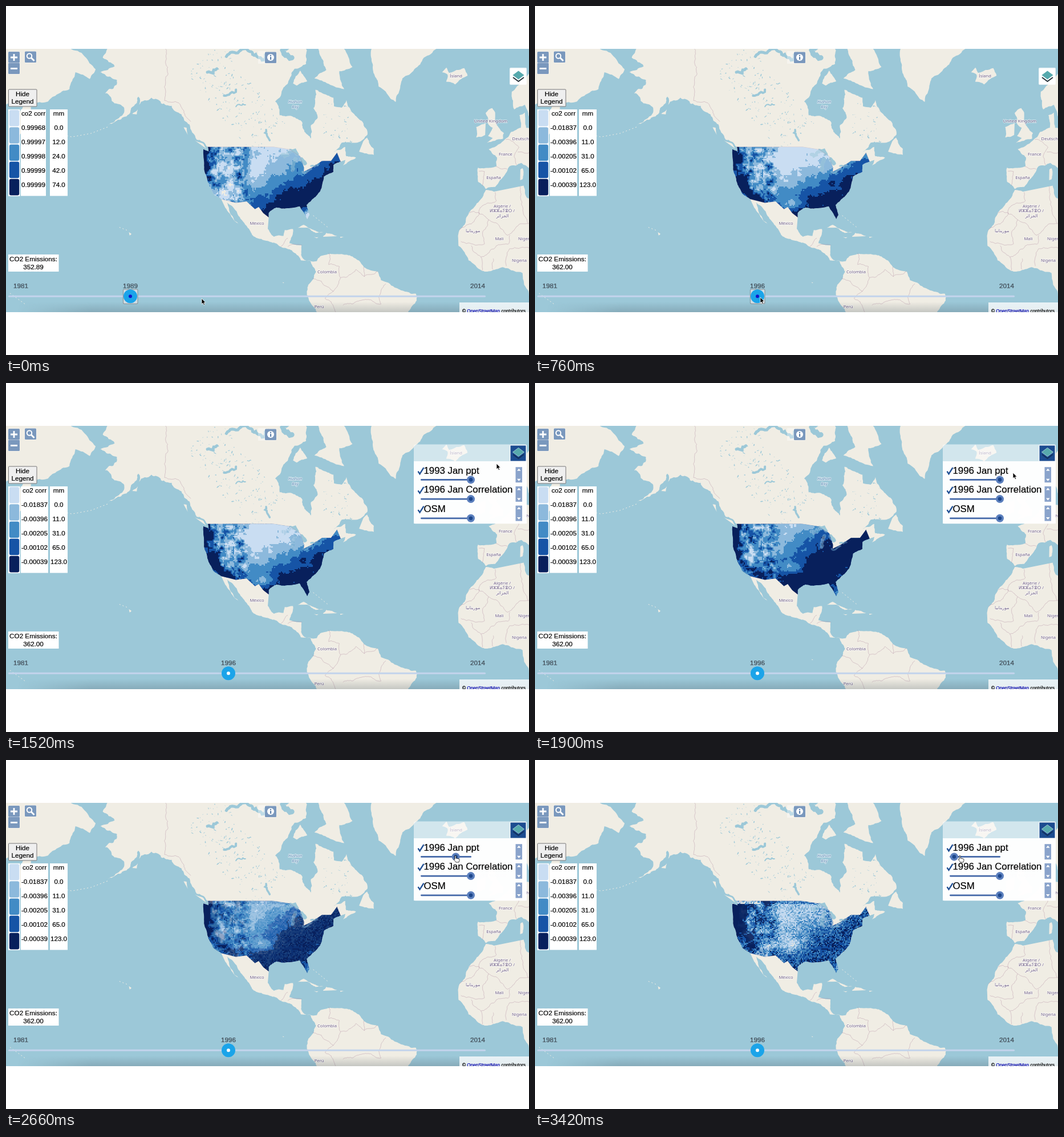
Animation, 917 px wide and 611 px high, one loop 3.8 s. Source, as an HTML page with a canvas:

```html
<!DOCTYPE html>
<html lang="en">
<head>
<meta charset="utf-8">
<title>Climate map</title>
<style>
html, body { margin: 0; width: 100%; height: 100%; overflow: hidden; background: #fff; }
#map { position: absolute; left: 0; top: 75px; width: 917px; height: 461px; overflow: hidden; background: #9cc8d8; }
#map > * { position: absolute; left: 0; top: 0; }
#shade { top: 443px; width: 917px; height: 18px;
  background: linear-gradient(transparent, rgba(70, 85, 95, .25));
  -webkit-mask-image: linear-gradient(90deg, transparent 20px, #000 150px);
  mask-image: linear-gradient(90deg, transparent 20px, #000 150px); }
svg { font: 11.7px "Liberation Sans", Arial, Helvetica, sans-serif; }
svg text { paint-order: stroke; stroke: currentColor; stroke-width: .2; }
</style>
</head>
<body>
<div id="map">
  <canvas id="base" width="917" height="461"></canvas>
  <div id="shade"></div>
  <svg id="ui" width="917" height="461" viewBox="0 75 917 461"></svg>
</div>
<script>
const TOP = 75, WATER = '#9cc8d8', LAND = '#f0ede4';
const BLUES = ['#c9ddf2', '#8cb9dc', '#428bc5', '#1654a6', '#08205c'];
const map = document.getElementById('map'), ui = document.getElementById('ui');
const clamp = (v, lo, hi) => Math.max(lo, Math.min(hi, v));
const bump = (x, y, cx, cy, rx, ry) => Math.exp(-(((x - cx) / rx) ** 2) - ((y - cy) / ry) ** 2);

const hash = (x, y, s = 0) => {
  const v = Math.sin(x * 127.1 + y * 311.7 + s * 74.7) * 43758.5453;
  return v - Math.floor(v);
};

// Web Mercator, "lon,lat lon,lat ..." to stage pixels
const project = ([lon, lat]) => [866 + 4.17 * lon,
  482 - 239 * Math.log(Math.tan(Math.PI / 4 + lat * Math.PI / 360))];
const line = s => s.trim().split(/\s+/).map(p => project(p.split(',').map(Number)));

// midpoint displacement between key points gives a ragged edge
function ragged(a, b, k) {
  const dx = b[0] - a[0], dy = b[1] - a[1];
  if (Math.hypot(dx, dy) < 4) return [a];
  const d = (hash(Math.round(a[0]), Math.round(b[1])) - .5) * k;
  const mid = [(a[0] + b[0]) / 2 - dy * d, (a[1] + b[1]) / 2 + dx * d];
  return [...ragged(a, mid, k), ...ragged(mid, b, k)];
}
function coast(s, k = .2) {
  const pts = line(s);
  return pts.flatMap((p, i) => i + 1 < pts.length ? ragged(p, pts[i + 1], k) : [p]);
}

const alaska = coast(`-141,71 -164,70 -167,68 -162,66.6 -168,65.6 -161,64.2 -166,61.7 -162,59.6 -158,58.7 -158.5,57.2
  -165,54.6 -156,57.2 -152,61 -151.7,59.3 -146.5,60.8 -138,59.1 -130.5,54.8 -127.5,51 -123.5,49.3`, .35);
const usWest = coast('-122.8,49 -122.5,47.8 -124.7,48.4 -124.4,42.5 -122.5,37.5 -120.6,34.5 -117.2,32.6', .1);
const pacific = coast(`-115.5,29.5 -112,25 -109.6,23.1 -114.7,31.4 -112.5,30 -109.4,26 -105.5,21.5 -103.5,18.5 -95,16
  -91.5,14 -87.5,12.9 -83.7,8.8 -79.6,8.6 -77.3,4 -80.6,-1.5 -81.2,-5.5 -77.5,-11.5 -76.5,-14`);
const atlantic = coast(`-39,-14 -38.5,-12.5 -35,-8 -35.3,-5.2 -44.3,-2.6 -50,.5 -51.3,4 -57.2,6 -62,10.4 -71.4,11.5
  -75.5,10.5 -77,8.4 -82.3,9 -83.6,11 -83.4,15 -88.5,15.8 -87,21.4 -90.5,21 -91,18.7 -95,18.4 -97.6,21.5`);
const usEast = coast(`-97.2,25.9 -97.2,27.6 -94,29.6 -89.4,29.3 -84.2,30 -82.7,28 -81,25.2 -80.1,26.8 -81.3,30.5
  -75.6,35.3 -74,40.2 -70,41.7 -70,43.8 -67,44.8`, .15);
const canada = coast(`-65,45.3 -66,43.7 -60.5,46 -64.6,46.4 -65,49 -70,47.6 -66.5,50.2 -60,50.2 -55.7,52.3 -61.8,57.5
  -64.5,60.3 -66.5,58.7 -69.8,59 -70,60.8 -77.5,62.4 -78.4,58.6 -76.6,56.5 -79.5,54.6 -79.5,51.3 -82.2,53 -83,55.2
  -92.6,57 -94.5,60 -91,62.8 -86.3,66.2 -81.5,67 -82,71`, .25);
const mexBorder = line('-117.2,32.6 -111,31.3 -106.5,31.8 -103,29 -101.4,29.8 -99.5,27.5 -97.2,25.9');
const usNorth = line(`-67,44.8 -68.5,47.4 -71,45 -74.8,45 -79,43 -82.5,41.7 -82.4,43 -84,46.4 -88.4,48.3 -95.2,49 -122.8,49`);

const usa = [...usWest, ...mexBorder, ...usEast, ...usNorth];
const land = [
  [...alaska, ...usWest, ...pacific, ...atlantic, ...usEast, ...canada],
  ...[
    // Siberia, Baffin, Southampton, Newfoundland
    '-208,71 -181,69.5 -170,66.1 -172.5,64.4 -178.5,65.6 -181,62.5 -190,60 -197,59.5 -198,55 -203,51 -204,56 -197,62 -208,59.2',
    '-78,71 -67,70.5 -62,66.5 -67.5,65.8 -65.5,62.5 -72,63.5 -78,64.5 -73,66 -76,69',
    '-85.5,63.2 -81,64 -84,65.9 -87,63.6',
    '-59.2,47.7 -53,46.8 -53,48.5 -55.8,51.5 -57.5,50.5',
    // Greenland, Iceland, Great Britain, Ireland
    '-54,71 -53.5,67 -51,63 -46,60.6 -43.8,59.9 -41,64.5 -32,68 -22,71',
    '-22.5,66.4 -21.4,65.5 -15,66.3 -13.6,65 -18.8,63.4 -22.6,63.9 -22,65.2 -24.3,65.6',
    '-5.5,50.1 1.3,51.2 1.7,52.7 -2,55.8 -2,57.6 -3.2,58.6 -6,57.5 -4.8,54.8 -3,54 -5,52 -3,51.4',
    '-6.2,52.2 -10,51.6 -10,54.2 -6,55.2',
    // Scandinavia, Europe, Africa
    '16,68 12.5,65.5 5,62 6,58.3 10.5,59.3 13,55.6 16,55',
    `16,54 11,54 10.5,57.6 8.2,57 8.8,54 4.8,53 1.7,50.8 -1.6,49.2 -4.7,48.4 -1.2,46 -1.4,43.5 -9.2,43 -9.2,38.5
     -6,36.1 -2,36.8 0,39 3.1,42 4,43.4 9,44.4 16,40`,
    `10,37.2 11.2,33.2 16,32 16,-14 12.2,-6 9.5,3.5 6,4.3 1,5.9 -7.5,4.4 -13.2,8.8 -17.4,14.7 -17,21 -13,27.8
     -9.8,31 -5.9,35.8 -2.5,35.2`,
    // islands
    '8.6,42.4 9.5,42.8 9.5,39.3 8.5,39', '-85,21.9 -82.5,23.1 -74.2,20.2 -77.5,19.9 -81,22', '-74.4,18.4 -73,19.9 -68.4,18.6',
    '-78.3,18.3 -76.3,18.2 -77,17.8', '-67.2,18.4 -65.7,18.4 -67,17.9', '-156,20.2 -154.9,19.5 -155.7,18.9',
    '-128.3,50.8 -125,50 -123.4,48.5', '-133,54.1 -131.7,54 -131.2,52.2', '-154.6,57.3 -152.3,58.3 -152.7,57.2'
  ].map(s => coast(s))
];
const chains = ['-165,54.2 -172,52.6 -180,51.7 -188,52.9', '-160,22.1 -156.4,20.8', '-78.5,26.6 -72,21.8',
  '-206,-5 -199,-10', '-91.3,-.5 -90.2,-.8'].map(line);
// width, then the middle line of each lake
const lakes = [[6, '-91.5,46.9 -88,48 -85.3,47'], [6, '-87.2,42.2 -86.8,44 -86,45.6'], [7, '-83.5,45.5 -82,44.3'],
  [3, '-83,41.7 -79.3,42.6'], [3, '-79.4,43.5 -76.6,43.7'], [3.5, '-98.3,53.5 -96.8,50.8'], [5, '-123,65.6 -119,66.2'],
  [4, '-116,61.2 -111,62.4'], [2, '-111,58.9 -107,59.3'], [5, '-115,68.2 -104,68.5 -96,68.5'], [9, '-89,71 -87.5,68']
].map(([w, s]) => [w, coast(s, .6)]);
const borders = ['-141,69.6 -141,60.2 -135,59.7 -130,55.5', '-72,11.8 -72,7 -67.5,6.2 -67,1.5 -70,-4.2 -73.5,-7 -69,-13',
  '-78.8,1.5 -72,-2.5 -70,-4.2', '-67,1.5 -60.5,5 -57,2 -51.5,4.2', '-57,2 -57.2,6', '-66,-10 -50,-9.5 -48,-1',
  '-92,14.6 -89.2,17.8', '-89.2,14.4 -83.2,15', '-13,27.6 -8.7,27.6 -12,23.4 -17,21.2', '-2,35 -1.5,32 -8.7,28.7 -8.7,27.3 -4.8,25 3.2,19 12,23.5',
  '-4.8,25 -6.5,15.5 -16.4,16.5', '12,23.5 9.5,30 8.5,37', '4.2,19 3.5,15.4 -4,13 -8,10.2 -12,14.8', '2.7,6.4 4,13.5 13,13.5',
  '-3,5 -2.8,9.5', '-7.5,4.5 -8,10.2', '-1.7,43.4 3.1,42.5', '-8.8,41.9 -6.5,41.8 -7.4,37.2', '2.5,51 8,49 6,46.2 7,43.8', '7.5,47.6 13,47.6'
].map(s => coast(s, .3)).concat([mexBorder, usNorth]);

const trace = (g, pts) => pts.forEach(([x, y], i) => i ? g.lineTo(x, y) : g.moveTo(x, y));
function shape(g, pts) { g.beginPath(); trace(g, pts); g.closePath(); g.fill(); }
function stroke(g, pts) { g.beginPath(); trace(g, pts); g.stroke(); }
function drawLakes(g) {
  g.strokeStyle = WATER;
  g.lineCap = 'round';
  for (const [w, pts] of lakes) { g.lineWidth = w; stroke(g, pts); }
  g.lineCap = 'butt';
}

function drawBase() {
  const g = document.getElementById('base').getContext('2d');
  g.translate(0, -TOP);
  g.fillStyle = g.strokeStyle = LAND;
  land.forEach(p => shape(g, p));
  g.setLineDash([2, 4]);
  chains.forEach(p => stroke(g, p));
  g.setLineDash([]);
  drawLakes(g);
  g.fillStyle = WATER;
  for (let i = 0; i < 220; i++) {
    const t = hash(i, 1), u = hash(i, 2) - .5, east = i % 5 == 0;
    const x = east ? 555 + t * 55 : 345 + t * 115 + u * 60;
    const y = east ? 205 + u * 70 : 92 + t * 140 - u * 50;
    g.beginPath();
    g.ellipse(x, y, .3 + hash(i, 3) ** 2 * 2.4, .3 + hash(i, 4) * .6, hash(i, 5) * 3, 0, 7);
    g.fill();
  }
  g.strokeStyle = 'rgba(165,125,150,.5)';
  g.lineWidth = .7;
  borders.forEach(p => stroke(g, p));

  g.textAlign = 'center';
  g.lineWidth = 1.8;
  g.lineJoin = 'round';
  g.strokeStyle = 'rgba(255,255,255,.6)';
  const label = (s, x, y) => {
    const bay = x === 507;
    g.font = `${bay ? 'italic 7' : 7.6}px "Noto Sans", "DejaVu Sans", sans-serif`;
    g.fillStyle = bay ? '#5f88b5' : '#6d5c86';
    g.strokeText(s, x, y);
    g.fillText(s, x, y);
  };
  `Hudson 507 170|Bay 507 179|United States 453 314|México 440 383|Colombia 563 468|Perú 549 529|Ísland 789 125
  |United Kingdom 850 204|Deutschland 910 235|France 876 262|España 855 303|Algérie / 870 353|ⵍⵣⵣⴰⵢⴻⵔ / 870 361
  |الجزائر 870 370|موريتانيا 819 396|Mali 865 410|Niger 908 410|Nigeria 900 448`.split('|').forEach(s => {
    const [, name, x, y] = s.trim().match(/^(.+) (\d+) (\d+)$/);
    label(name, +x, +y);
  });
}

function noise(x, y, s) {
  const i = Math.floor(x), j = Math.floor(y);
  const ease = t => t * t * (3 - 2 * t), u = ease(x - i), v = ease(y - j);
  const row = k => hash(i, k, s) * (1 - u) + hash(i + 1, k, s) * u;
  return row(j) * (1 - v) + row(j + 1) * v - .5;
}
const cloud = (x, y, s) => noise(x / 14, y / 14, s) + noise(x / 6, y / 6, s + 1) * .8 + noise(x / 2.6, y / 2.6, s + 2) * .6;

/* Wetness 0..5: a wet coast, rugged mountains and a diagonal eastern front.
   front: y of its dark edge at x 450, slope: its rise, fade: px per level, dry: centre of a bare patch */
function wetness(x, y, o) {
  const shore = 347 + Math.max(0, y - 290) * .75, north = clamp((345 - y) / 70, 0, 1);
  const edge = y + o.slope * (x - 450) - o.front;
  const east = clamp(o.peak + edge / o.fade, o.floor, o.peak + .6);
  const coastal = 4.6 * Math.exp(-(((x - shore) / o.shore) ** 2)) * (o.south ? 1 : north);
  const hills = clamp((432 - x) / 18, 0, 1);
  const tip = bump(x, y, 530, 368, 10, 13) * o.tip;
  const bare = bump(x, y, o.dry[0], o.dry[1], 18, 11) * 2;
  const rough = cloud(x, y, o.seed) * (hills * 2.2 + .8);
  return east + coastal + hills * o.hills * (.4 + north) + rough - bare + tip;
}

function dataLayer(o) {
  const c = document.createElement('canvas');
  c.width = 917;
  c.height = 461;
  const g = c.getContext('2d');
  g.translate(0, -TOP);
  g.save();
  g.beginPath();
  trace(g, usa);
  g.clip();
  for (let y = 246; y < 380; y += 2) for (let x = 342; x < 594; x += 2) {
    let v = wetness(x, y, o);
    if (o.speckle) {
      const r = hash(x, y, o.seed);
      v += (r - .5) * o.speckle;
      if (y < 252) v = x < 395 ? r * 5 - 2 : v + 1.5;
    }
    if (v < -.4) continue;
    g.fillStyle = BLUES[clamp(Math.floor(v), 0, 4)];
    g.fillRect(x, y, 2, 2);
  }
  g.restore();
  g.globalCompositeOperation = 'destination-out';
  g.globalAlpha = .5;
  drawLakes(g);
  map.insertBefore(c, document.getElementById('shade'));
  return c;
}

drawBase();
const layers = {
  corr: dataLayer({ seed: 7, front: 345, slope: .65, fade: 30, peak: 3.1, floor: 1, shore: 24, hills: 1.6, dry: [450, 322], tip: -1, speckle: 2.2 }),
  1989: dataLayer({ seed: 11, front: 352, slope: .62, fade: 22, peak: 4, floor: .6, shore: 9, hills: 1.1, dry: [380, 325], tip: -5 }),
  1993: dataLayer({ seed: 23, front: 352, slope: .5, fade: 20, peak: 4, floor: .4, shore: 12, hills: 1.2, dry: [450, 345], tip: 1, south: 1 }),
  1996: dataLayer({ seed: 37, front: 324, slope: .8, fade: 24, peak: 4, floor: 1.1, shore: 11, hills: 1, dry: [448, 322], tip: -2 })
};

// legend columns and emission value by year
const legends = {
  1989: ['0.99968 0.99997 0.99998 0.99999 0.99999', '0.0 12.0 24.0 42.0 74.0', '352.89'],
  1993: ['0.00021 0.99992 0.99997 0.99999 0.99999', '0.0 22.0 44.0 75.0 124.0', '356.92'],
  1996: ['-0.01837 -0.00396 -0.00205 -0.00102 -0.00039', '0.0 11.0 31.0 65.0 123.0', '362.00']
};

const STEP = 380;
const late = { x: 390, year: 1996, ppt: 1996, op: 1, corr: 1, panel: 1 };
const slide = (op, x) => ({ ...late, op, cur: [x, 167], hand: 1 });
const steps = [
  { x: 218, year: 1989, ppt: 1989, op: 1, cur: [343, 512] },
  { x: 278, year: 1993, cur: [323, 507] },
  { x: 390, year: 1996, ppt: 1993, op: 1, cur: [395, 510] },
  { ...late, ppt: 1993, op: .38, panel: 0, hover: 1, cur: [899, 119] },
  { ...late, ppt: 1993, cur: [860, 141] },
  { ...late, cur: [838, 157] },
  slide(1, 814), slide(.7, 787), slide(.4, 752), slide(.09, 744)
];

const rect = (x, y, w, h, fill, more = '') => `<rect x="${x}" y="${y}" width="${w}" height="${h}" fill="${fill}" ${more}/>`;
const dot = (x, y, r, fill, more = '') => `<circle cx="${x}" cy="${y}" r="${r}" fill="${fill}" ${more}/>`;
const path = (d, fill, more = '') => `<path d="${d}" fill="${fill}" ${more}/>`;
const text = (s, x, y, more = 'text-anchor="middle"') => `<text x="${x}" y="${y}" ${more}>${s}</text>`;
const yearText = (s, x) => text(s, x, 494, 'text-anchor="middle" fill="#46525e"');
const whiteLine = d => path(d, 'none', 'stroke="#fff" stroke-width="2.8"');
const button = (x, y, icon) => rect(x - .5, y - .5, 21, 20.5, '#fff', 'opacity=".5" rx="2"') +
  rect(x, y, 20, 19.5, '#7a98bd', 'rx="1.5"') + icon;

const fixed = button(4, 80, whiteLine('M8 90H20M14 84V96')) + button(4, 99.5, whiteLine('M8 109.5H20')) +
  button(33, 79.5, dot(41, 87.5, 4.2, 'none', 'stroke="#fff" stroke-width="2"') + whiteLine('M44 90.5L49.5 96')) +
  rect(442, 79, 13, 22, '#fff', 'opacity=".35"') +
  button(454, 80.5, dot(464, 90, 6, '#fff') + rect(463, 89, 2.2, 5, '#5f80aa') + dot(464, 86.8, 1.2, '#5f80aa')) +
  rect(4.5, 146, 49.5, 30, '#efefef', 'stroke="#777" rx="1"') + text('Hide', 29, 158) + text('Legend', 29, 171) +
  rect(4, 435, 88.5, 30, '#fff') + text('CO2 Emissions:', 48, 447) +
  rect(4, 506.7, 837, 3, '#c3d4ec', 'rx="1.5"') + yearText(1981, 26) + yearText(2014, 827) +
  rect(795, 519, 122, 17, '#fff', 'opacity=".78"') +
  text('© <tspan fill="#0000d8" text-decoration="underline">OpenStreetMap</tspan> contributors.', 800, 536.5, 'font-size="8.2"');

function legend(year) {
  const [corr, mm, co2] = legends[year];
  const w1 = corr[0] === '-' ? 48 : 44, w2 = mm.length > 22 ? 31 : 24;
  const column = (head, values, x, w) => rect(x, 181, w, 151.5, '#fff') +
    [head, ...values.split(' ')].map((v, i) => text(v, x + w / 2, 192 + i * 25)).join('');
  return rect(4, 181, 20.5, 152, '#fff') + BLUES.map((b, i) => rect(5.8, 182 + i * 30.2, 17.4, 28.6, b, 'rx="3"')).join('') +
    column('co2 corr', corr, 26, w1) + column('mm', mm, 77, w2) + text(co2, 48, 461);
}

function handle(s) {
  const box = s.panel ? '' : rect(s.x - 12.5, 495.8, 25.5, 25.5, '#cfdde4', 'stroke="#8d989f" stroke-width="1.2" rx="2"');
  return yearText(s.year, s.x) + box + dot(s.x, 508.3, 12, '#1ba4e9') + dot(s.x, 508.3, 3, s.panel ? '#fff' : '#1414c8');
}

function row(name, i, op) {
  const y = 158.7 + i * 33.7, knob = 727 + 88 * op;
  return path(`M722.5 ${y - 4}l3 4.5l7-11`, 'none', 'stroke="#1f4f94" stroke-width="2.4"') +
    text(name, 732.5, y, 'font-size="16.8"') +
    rect(727, y + 9.3, 89, 2.8, '#4468a8', 'rx="1.4"') + dot(knob, y + 10.7, 7, '#5b7fbd') + dot(knob, y + 10.7, 3.3, '#1d478c') +
    rect(893.5, y - 11.5, 11.5, 27, '#8aa3cb') + path(`M896 ${y - 5}h6.6l-3.3-4zM896 ${y + 9}h6.6l-3.3 4z`, '#fff');
}

function switcher(s) {
  const panel = s.panel ? rect(715, 107.5, 198, 139, '#fff', 'opacity=".55" rx="3"') +
    rect(715, 137, 198, 109, '#fff', 'opacity=".95"') +
    row(s.ppt + ' Jan ppt', 0, s.op) + row('1996 Jan Correlation', 1, 1) + row('OSM', 2, 1) : '';
  const dark = s.panel || s.hover;
  return panel + rect(883, 108, 30, 30, '#fff', 'opacity=".8" rx="2"') + rect(884.5, 109.5, 27, 27, dark ? '#1c4c90' : '#fff') +
    path('M889 125l9.5 7l9.5-7', 'none', `stroke="${dark ? '#12305c' : '#27343c'}" stroke-width="2"`) +
    path('M898.5 113.5l10 7.5l-10 7.5l-10-7.5z', '#57a9ad', dark ? 'stroke="#b5dadd" stroke-width=".8"' : '');
}

function cursor({ cur: [x, y], hand }) {
  const at = `transform="translate(${x} ${y})" stroke-width=".8"`;
  return hand
    ? path('M0 1Q1-.6 2 1V5L7 6Q8.4 6.6 8 8.5L7 12H2L-1.8 7.3Q-1.6 5.8 0 7Z', '#fff', `stroke="#111" ${at}`)
    : path('M0 0V10L2.3 8L3.9 11.6L5.6 10.8L4 7.3H7Z', '#000', `stroke="#fff" ${at}`);
}

let shown = -1;
function show(i) {
  const s = steps[i];
  for (const [name, layer] of Object.entries(layers)) {
    layer.style.opacity = name === 'corr' ? s.corr || 0 : +name === s.ppt ? s.op : 0;
  }
  ui.innerHTML = fixed + legend(s.year) + handle(s) + switcher(s) + cursor(s);
  shown = i;
}

const start = performance.now();
function tick() {
  const i = Math.floor(Math.max(0, performance.now() - start) / STEP) % steps.length;
  if (i !== shown) show(i);
  requestAnimationFrame(tick);
}
tick();
</script>
</body>
</html>
```
